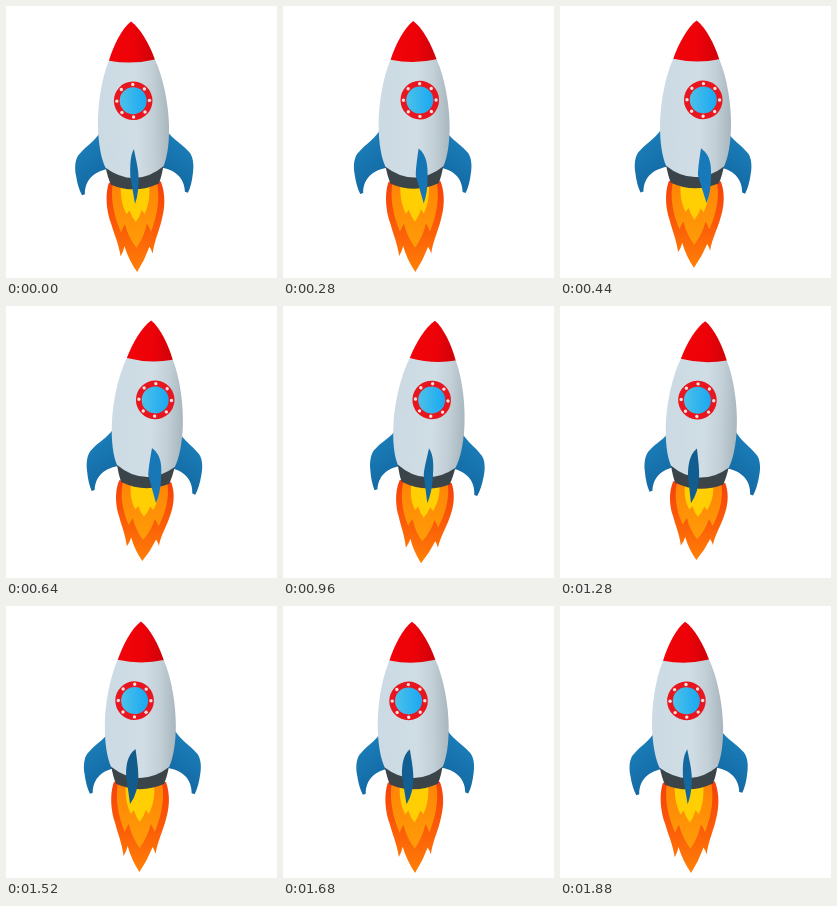
An HTML page that plays this animation: 271x272 px, repeating every 1920 ms.

```html
<!DOCTYPE html>
<html lang="en">
<head>
<meta charset="utf-8">
<title>Rocket</title>
<style>
html, body { margin: 0; width: 100%; height: 100%; overflow: hidden; background: #fff; }
svg { display: block; width: 100vw; height: 100vh; }
</style>
</head>
<body>
<svg viewBox="0 0 271 272">
  <defs>
    <linearGradient id="hull"><stop offset="0" stop-color="#cbdae3"/><stop offset=".55" stop-color="#d0dde5"/><stop offset=".78" stop-color="#c2cfd7"/><stop offset="1" stop-color="#a8b6be"/></linearGradient>
    <linearGradient id="cone"><stop offset="0" stop-color="#f20409"/><stop offset=".55" stop-color="#ec0208"/><stop offset="1" stop-color="#cf0209"/></linearGradient>
    <linearGradient id="wing" x1="0" y1="0" x2=".4" y2="1"><stop offset="0" stop-color="#1d84bf"/><stop offset="1" stop-color="#1368a2"/></linearGradient>
    <linearGradient id="glass"><stop offset="0" stop-color="#4cc1e9"/><stop offset="1" stop-color="#1aa8f2"/></linearGradient>
    <linearGradient id="outer" x2="0" y2="1"><stop offset="0" stop-color="#f5400a"/><stop offset=".5" stop-color="#fb5c08"/><stop offset="1" stop-color="#ff8006"/></linearGradient>
    <linearGradient id="middle" x2="0" y2="1"><stop offset="0" stop-color="#ff8405"/><stop offset="1" stop-color="#ff9c08"/></linearGradient>
  </defs>
  <g id="rocket">
    <g id="flame">
      <path fill="url(#outer)" d="M-26-4C-31 10-28 28-25 36C-22 48-18 56-16 70Q-13 65-12 60Q-8 74 0 86Q8 74 13 61Q15 64 16 68C18 55 23 46 26 34C29 24 31 10 26-4Z"/>
      <path fill="url(#middle)" d="M-22-4C-25 12-22 29-15 46Q-13 41-11 38Q-8 51 0 62Q8 51 11 38Q13 41 15 46C22 29 25 12 22-4Z"/>
      <path fill="#ffcf04" d="M-14-4C-15 8-14 18-9 28L-6 24Q-4 31 0 36Q4 31 6 24L9 28C14 18 15 8 14-4Z"/>
    </g>
    <g id="wings" fill="url(#wing)">
      <path id="side" d="M-33 125C-40 135-48 139-54 146C-59 150-60 160-58.5 168Q-57 180-53 188L-50 187C-50 176-44 165-26 162Z"/>
      <use href="#side" transform="scale(-1 1)"/>
    </g>
    <path fill="#3a4449" d="M-29 160Q-27 171-24 178Q0 188.500 24 178Q27 171 29 160Z"/>
    <path fill="url(#hull)" d="M-23 54C-31 72-35.500 99-35.500 120C-35.500 138-33 152-29 161Q-15 172 0 172Q15 172 29 161C33 152 35.500 138 35.500 120C35.500 99 31 72 23 54Z"/>
    <path fill="url(#cone)" d="M0 15.500C-9 22-18 39-23 54Q0 59 23 54C18 39 9 22 0 15.500Z"/>
    <g id="porthole">
      <circle r="19.300" fill="#e8161e"/>
      <circle r="13.500" fill="url(#glass)"/>
      <g id="rivets" fill="#f9dfe0"></g>
    </g>
    <path id="fin"/>
  </g>
</svg>
<script>
const LOOP = 1920, STEP = 40;
const byId = id => document.getElementById(id);

// [time, y of the flame tip]
const FLICKER = [[0, 266], [120, 268], [280, 266], [420, 262], [640, 255], [780, 266], [960, 257],
  [1120, 266], [1280, 254], [1400, 261], [1520, 266], [1700, 267], [1880, 267], [1920, 266]];

for (let i = 0; i < 8; i++) {
  const dot = document.createElementNS("http://www.w3.org/2000/svg", "circle");
  const angle = i * Math.PI / 4;
  dot.setAttribute("cx", 16.3 * Math.cos(angle));
  dot.setAttribute("cy", 16.3 * Math.sin(angle));
  dot.setAttribute("r", 1.7);
  byId("rivets").append(dot);
}

function flameTip(t) {
  const i = FLICKER.findIndex(key => key[0] > t);
  const [t0, y0] = FLICKER[i - 1], [t1, y1] = FLICKER[i];
  const ease = (1 - Math.cos(Math.PI * (t - t0) / (t1 - t0))) / 2;
  return y0 + (y1 - y0) * ease;
}

function finPath(shift) {
  const top = shift * 0.6, low = shift * 1.25;
  const half = 4 + 0.27 * Math.abs(shift);
  const left = shift - half, right = shift + half;
  // The edge facing the hull is straighter than the one that swings outwards.
  const leftTop = shift > 0 ? top - 1 : left;
  const rightTop = shift > 0 ? right : top + 1;
  return `M${top} 143C${leftTop} 150 ${left} 162 ${left} 170Q${(left + low) / 2} 184 ${low} 198` +
    `Q${right} 187 ${right} 170C${right} 162 ${rightTop} 150 ${top} 143Z`;
}

function draw(t) {
  const phase = 2 * Math.PI * t / LOOP;
  const s = Math.sin(phase), c = Math.cos(phase);
  const tilt = 0.95 - 2.35 * c;
  const lift = 0.6 * c - 0.6 - 0.4 * s;
  const stretch = (flameTip(t) - lift - 180) / 86;

  byId("rocket").setAttribute("transform", `translate(133 ${lift}) rotate(${tilt} 0 345)`);
  byId("porthole").setAttribute("transform", `translate(${0.8 + 6.8 * s - 0.5 * c} 94.7)`);
  byId("fin").setAttribute("d", finPath(1 + 8.8 * s - 1.3 * c));
  byId("fin").setAttribute("fill", `hsl(204 78% ${36 + 5 * s}%)`);
  byId("wings").setAttribute("transform", `translate(${0.3 - 2.2 * s - 0.5 * c} 0) scale(${0.985 + 0.015 * c} 1)`);
  byId("flame").setAttribute("transform", `translate(0 180) scale(1 ${stretch})`);
}

const start = performance.now();
function tick() {
  const t = (performance.now() - start) % LOOP;
  draw(Math.floor(t / STEP) * STEP);
  requestAnimationFrame(tick);
}
draw(0);
requestAnimationFrame(tick);
</script>
</body>
</html>
```
